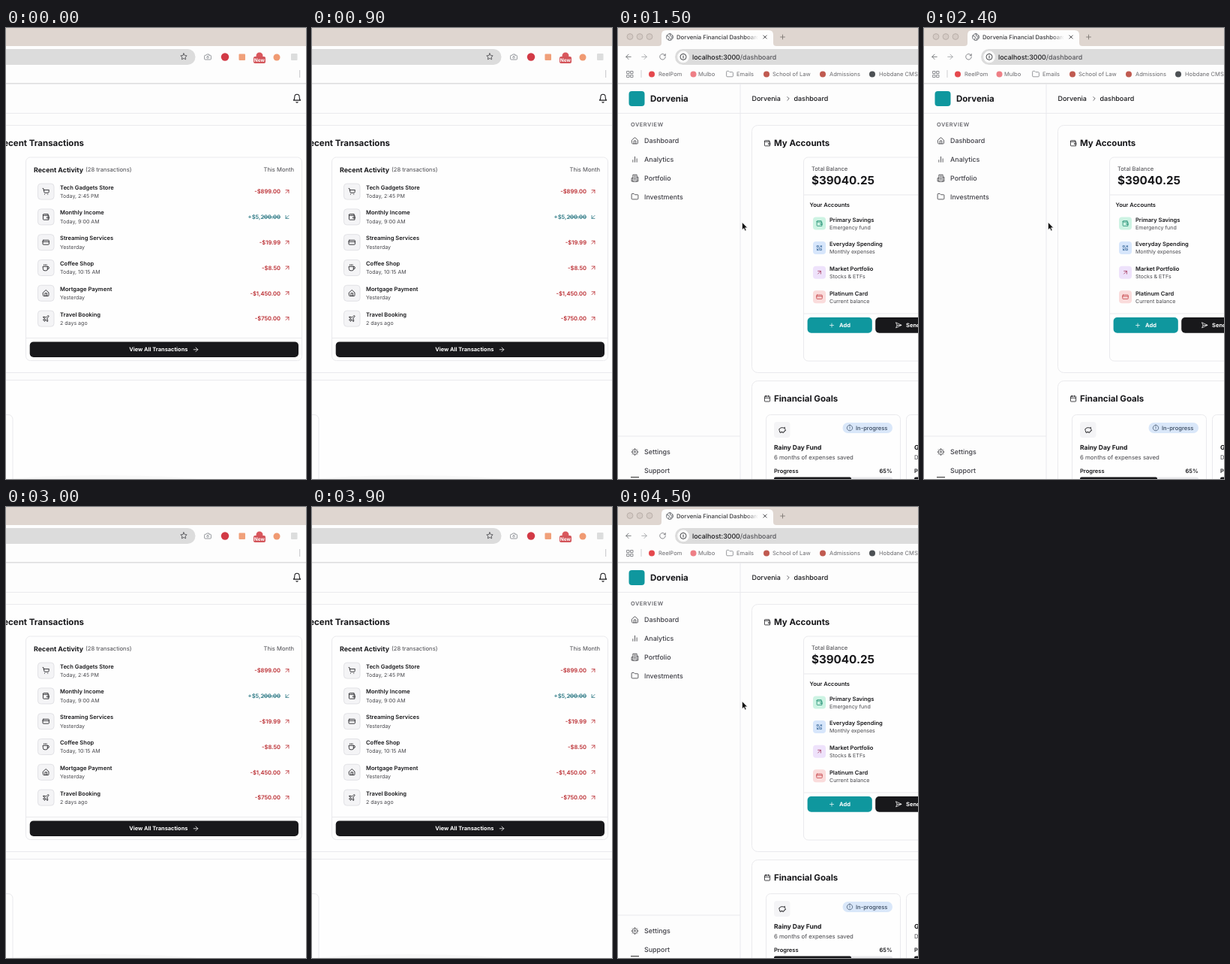
Write an HTML page that moves like this. It is 400 px wide and 600 px high and loops after 6 s.

```html
<!DOCTYPE html>
<html lang="en">
<head>
<meta charset="utf-8">
<title>Dashboard</title>
<style>
html, body { margin: 0; width: 100%; height: 100%; overflow: hidden; background: #fdfdfd; }
svg { display: block; width: 400px; height: 600px; }
text { font-family: Inter, "Open Sans", sans-serif; text-rendering: geometricPrecision; }
.icon { fill: none; stroke-width: 2; stroke-linecap: round; stroke-linejoin: round; }
</style>
</head>
<body>
<svg id="stage" viewBox="0 0 400 600"></svg>
<script>
const INK = '#18181b', GREY = '#46464b', LINE = '#eaeaed', TEAL = '#0f979e', RED = '#b9282d';
const BAR = '#dfd6d0', FIELD = '#dcdcdc';

// Icons on a 24 unit grid
const ICONS = {
  cart: 'M2 2h2l3 13a2 2 0 0 0 2 1h10a2 2 0 0 0 2-1l1-8H5M8 20.5v.5M18 20.5v.5',
  wallet: 'M19 7V3H5a2 2 0 0 0 0 4h16v5h-4a2 2 0 0 0 0 4h5v-4h-1M3 5v14a2 2 0 0 0 2 2h16v-5',
  card: 'M4 5h16a2 2 0 0 1 2 2v10a2 2 0 0 1-2 2H4a2 2 0 0 1-2-2V7a2 2 0 0 1 2-2zM2 10h20',
  cup: 'M6 2v2M10 2v2M14 2v2M3 8h14v9a4 4 0 0 1-4 4H7a4 4 0 0 1-4-4zM17 8h1a4 4 0 0 1 0 8h-1',
  home: 'M9 21v-9h6v9M3 10l9-8 9 8v9a2 2 0 0 1-2 2H5a2 2 0 0 1-2-2z',
  plane: 'M18 19l-2-8 4-4c2-2 1-4 1-4s-2-1-4 1l-4 4-9-2-1 2 6 4-2 3H4l-1 1 3 2 2 3 1-1v-3l3-2 4 6z',
  bell: 'M6 8a6 6 0 0 1 12 0c0 7 3 9 3 9H3s3-2 3-9M10 21a2 2 0 0 0 4 0',
  upRight: 'M7 7h10v10M7 17 17 7',
  downLeft: 'M17 17H7V7M17 7 7 17',
  right: 'M5 12h14m-7-7 7 7-7 7',
  left: 'M19 12H5m7 7-7-7 7-7',
  plus: 'M5 12h14M12 5v14',
  cross: 'M18 6 6 18M6 6l12 12',
  chevron: 'm9 18 6-6-6-6',
  send: 'M3 3l4 9-4 9 19-9zM7 12h15',
  calendar: 'M5 4h14a2 2 0 0 1 2 2v14a2 2 0 0 1-2 2H5a2 2 0 0 1-2-2V6a2 2 0 0 1 2-2zM3 10h18M8 2v4M16 2v4',
  bars: 'M18 20V10M12 20V4M6 20v-6',
  building: 'M6 22V2h12v20zM6 12H2v10h4M18 9h4v13h-4M10 6h4M10 10h4M10 14h4M10 18h4',
  folder: 'M20 20a2 2 0 0 0 2-2V8a2 2 0 0 0-2-2h-8l-3-3H4a2 2 0 0 0-2 2v13a2 2 0 0 0 2 2z',
  gear: 'M12 4a8 8 0 1 0 .01 0zM12 9a3 3 0 1 0 .01 0zM12 2v2M12 20v2M2 12h2M20 12h2M5 5l1 1M18 18l1 1M5 19l1-1M18 6l1-1',
  pig: 'M5 9c3-4 9-4 12-2l3-2v4l2 3v3h-3l-2 5h-4v-2h-3v2H6l-1-5c-2-2-2-4 0-6z',
  alert: 'M12 2a10 10 0 1 0 .01 0zM12 7v5M12 16v.5',
  swap: 'M4 4h5v5H4zM20 4 4 20M15 5h5v5M14 15h6v5h-6zM4 14v6h5',
  star: 'M12 2l3 6.5 7 .8-5 4.9 1.3 7L12 17.8 5.7 21.2 7 14.2 2 9.3 9 8.5z',
  camera: 'M15 4H9L7 7H4a2 2 0 0 0-2 2v9a2 2 0 0 0 2 2h16a2 2 0 0 0 2-2V9a2 2 0 0 0-2-2h-3zM12 10a3 3 0 1 0 .01 0z',
  reload: 'M21 12a9 9 0 1 1-3-6.7L21 8M21 3v5h-5',
  grid: 'M4 4h6v6H4zM14 4h6v6h-6zM4 14h6v6H4zM14 14h6v6h-6z',
  globe: 'M12 2a10 10 0 1 0 .01 0zM3 8l6 2 2 4-3 6M14 3l-1 5 4 2 4-1M15 20l1-5 5-1'
};

// Text is placed by the middle of its capitals
const text = (x, y, s, size, weight = 400, fill = INK, more = '') =>
  `<text x="${x}" y="${y + size * .363}" font-size="${size}" font-weight="${weight}" fill="${fill}" ${more}>${s}</text>`;
const END = 'text-anchor="end"';
const rect = (x, y, w, h, r = 0, fill = 'none', stroke = 'none') =>
  `<rect x="${x}" y="${y}" width="${w}" height="${h}" rx="${r}" fill="${fill}" stroke="${stroke}"/>`;
const dot = (x, y, r, fill, stroke = 'none') =>
  `<circle cx="${x}" cy="${y}" r="${r}" fill="${fill}" stroke="${stroke}"/>`;
const icon = (name, x, y, size = 10, color = INK) =>
  `<path class="icon" d="${ICONS[name]}" stroke="${color}" transform="translate(${x - size / 2} ${y - size / 2}) scale(${size / 24})"/>`;
const hline = (x, y, w, color = LINE) => rect(x, y, w, 1, 0, color);
const panel = (x, y, w, h, r) => rect(x + .5, y + .5, w, h, r, '#fefefe', LINE);
const heading = (x, y, s, more) => text(x, y, s, 11.5, 700, INK, more);
const label = (x, y, s, color = INK, more = '') => text(x, y, s, 7.55, 600, color, more);
const note = (x, y, s) => text(x, y, s, 7.05, 400, GREY);

const frame = () => rect(0, 0, 400, 600, 0, '#fdfdfd') + rect(0, 0, 400, 24, 0, BAR)
  + rect(0, 73, 400, 1.6, 0, '#dededf') + hline(0, 113, 400);

function activity() {
  const rows = [
    ['cart', 'Tech Gadgets Store', 'Today, 2:45 PM', '-$899.00'],
    ['wallet', 'Monthly Income', 'Today, 9:00 AM', '+$5,200.00'],
    ['card', 'Streaming Services', 'Yesterday', '-$19.99'],
    ['cup', 'Coffee Shop', 'Today, 10:15 AM', '-$8.50'],
    ['home', 'Mortgage Payment', 'Yesterday', '-$1,450.00'],
    ['plane', 'Travel Booking', '2 days ago', '-$750.00']
  ];
  const list = rows.map(([name, title, when, sum], i) => {
    const y = 217.6 + i * 33.8, gain = sum[0] === '+', color = gain ? '#2a7783' : RED;
    return rect(42.5, y - 10.5, 21.5, 21, 4, '#f4f4f6', '#e2e2e6') + icon(name, 53.2, y)
      + label(72, y - 5.8, title) + note(72, y + 5.8, when)
      + label(366, y, sum, color, END) + (gain ? rect(342, y - .3, 24, .8, 0, color) : '')
      + icon(gain ? 'downLeft' : 'upRight', 375, y, 9.5, color);
  }).join('');
  return frame()
    + rect(-20, 28, 272.5, 21, 10.5, FIELD) + icon('star', 237, 38, 10, GREY)
    + icon('camera', 269, 38.5, 10.5, '#85898e') + dot(292, 38.5, 5.2, '#d23a46')
    + rect(310.5, 34.5, 8.5, 8.5, 1, '#f0a07a') + dot(338, 37, 4.5, '#d9575d')
    + rect(330, 38, 16, 9, 2, '#d3545a') + text(338, 42.6, 'New', 6.5, 700, '#fff', 'text-anchor="middle"')
    + dot(361, 39, 4.5, '#f09a72') + rect(380, 34, 8.5, 9, 1, '#dcdddd')
    + rect(391, 56, 1.2, 10, 0, '#cfcfd2') + icon('bell', 388, 93.5, 12.5)
    + panel(-30, 129, 460, 329, 8) + heading(104, 153, 'Recent Transactions', END)
    + panel(26, 171.5, 368, 270.5, 6)
    + text(37, 188.3, 'Recent Activity', 8.85, 700) + text(106, 188.6, '(28 transactions)', 7.65, 400, GREY)
    + text(384, 188.3, 'This Month', 7.65, 400, GREY, END)
    + list + hline(27, 412, 367)
    + rect(31.7, 417.4, 358.3, 20.6, 5, INK) + text(164.2, 427.7, 'View All Transactions', 7.4, 700, '#fff')
    + icon('right', 253, 427.8, 9.5, '#fff')
    + panel(-30, 468, 460, 160, 8) + panel(-30, 514, 38.5, 120, 6)
    + '<ellipse cx="130" cy="604" rx="140" ry="9" opacity=".025"/>';
}

function browser() {
  const marks = [
    [54, 'ReelPom', 45, '#e5484d'], [107, 'Mulbo', 100.5, '#ee7f86'], [158, 'Emails'],
    [206, 'School of Law', 198, '#c05a50'], [282, 'Admissions', 273, '#c05a50'], [348, 'Hobdane CMS', 339, '#4c5054']
  ];
  return [16, 29, 42].map(x => dot(x, 11.5, 3.9, '#d5cbc5', '#b9afa9')).join('')
    + '<path d="M54 24q4 0 4-4V9q0-6 6-6H201q6 0 6 6v11q0 4 4 4z" fill="#fdfdfd"/>'
    + icon('globe', 69, 12, 10.5, '#55595e')
    + text(78, 12, 'Dorvenia Financial Dashboard', 7.75, 500, '#3a3a3d', 'clip-path="url(#tab)"')
    + rect(170, 5, 17, 15, 0, 'url(#fade)')
    + icon('cross', 196, 12, 8.5) + icon('plus', 219.5, 12, 10, '#77716d')
    + icon('left', 14, 38.3, 11, '#707276') + icon('right', 35, 38.3, 11, '#a3a5a8') + icon('reload', 59.5, 38.3, 10, '#707276')
    + rect(76, 28, 360, 21, 10.5, FIELD) + dot(87, 38.4, 7.8, '#fdfdfd') + dot(87, 38.4, 4, 'none', '#3f4144')
    + rect(86.5, 36.5, 1, 4, 0, '#3f4144')
    + text(99, 38.6, 'localhost:3000<tspan fill="#55555a">/dashboard</tspan>', 8.85, 500)
    + icon('grid', 16, 61.5, 12, '#8a8c90') + rect(30.5, 56, 1, 10, 0, '#cfcfd2')
    + icon('folder', 149, 61.3, 10.5, '#8a8c90')
    + marks.map(([x, s, mx, color]) => text(x, 61.5, s, 7.55, 400, '#6a6a6e')
      + (color ? dot(mx, 61.5, 4, color) : '')).join('');
}

function sidebar() {
  const items = [['home', 'Dashboard', 150], ['bars', 'Analytics', 174.8], ['building', 'Portfolio', 199.6],
    ['folder', 'Investments', 224.4], ['gear', 'Settings', 564]];
  return rect(162.5, 74, 1, 526, 0, LINE) + rect(14.5, 84, 21, 20, 4, TEAL)
    + heading(43, 94, 'Dorvenia') + text(17, 128.6, 'OVERVIEW', 7.3, 600, '#66666c', 'letter-spacing=".6"')
    + items.map(([name, s, y]) => icon(name, 22.5, y, 10.5, GREY) + text(35, y, s, 8.9, 500, '#3f3f46')).join('')
    + hline(0, 542.5, 163) + text(35, 588.8, 'Support', 8.9, 500, '#3f3f46') + rect(17, 597, 11, 1.2, 0, '#444');
}

function accounts() {
  const rows = [
    ['wallet', 'Primary Savings', 'Emergency fund', '#cdf3e3', '#12876a'],
    ['swap', 'Everyday Spending', 'Monthly expenses', '#d7e6fb', '#3a6a9c'],
    ['upRight', 'Market Portfolio', 'Stocks &amp; ETFs', '#eee2fb', '#a02c52'],
    ['card', 'Platinum Card', 'Current balance', '#fadcdc', '#c0353a']
  ];
  return text(178.5, 93.7, 'Dorvenia', 8.95, 500) + icon('chevron', 227, 94, 9.5, GREY) + text(234.5, 93.7, 'dashboard', 8.95, 500)
    + panel(178, 129, 260, 329, 8) + icon('wallet', 199, 153.3, 9.5) + heading(208, 153, 'My Accounts')
    + panel(247, 171.5, 200, 271, 6) + text(258, 187.2, 'Total Balance', 7.6, 400, GREY)
    + text(258, 202.2, '$39040.25', 15.2, 700) + hline(248, 221.5, 160)
    + label(255.5, 235.2, 'Your Accounts')
    + rows.map(([name, title, about, back, color], i) => {
      const y = 260 + i * 32.6;
      return rect(260, y - 8.5, 17, 17, 4, back) + icon(name, 268.5, y, 9, color)
        + label(282, y - 5, title) + note(282, y + 5.3, about);
    }).join('')
    + hline(248, 379.5, 160)
    + rect(252.6, 385, 86.2, 20.8, 5, TEAL) + icon('plus', 285, 395.5, 8.5, '#fff') + text(295, 395.5, 'Add', 7.5, 700, '#fff')
    + rect(343.2, 385, 86.2, 20.8, 5, INK) + icon('send', 374, 395.5, 9, '#fff') + text(384, 395.5, 'Send', 7.5, 700, '#fff');
}

function goals() {
  return panel(178, 469, 260, 160, 8) + icon('calendar', 199, 493, 9.5) + heading(208, 492.7, 'Financial Goals')
    + panel(197, 514, 179, 110, 6) + panel(384, 514, 179, 110, 6)
    + rect(208, 524, 21.5, 21, 4, '#f4f4f6') + icon('pig', 218.7, 534.5, 11)
    + rect(299.5, 525, 66.5, 14, 7, '#d9e7f9') + icon('alert', 309, 532, 9, '#42566f')
    + text(317, 532, 'In-progress', 7.6, 500, '#38495f')
    + text(208, 558, 'Rainy Day Fund', 8.45, 700) + text(208, 571.3, '6 months of expenses saved', 7.8, 400, GREY)
    + label(208, 588.8, 'Progress') + label(365.5, 588.8, '65%', INK, END)
    + rect(208, 597.5, 158, 5, 2.5, '#e9e9ec') + rect(208, 597.5, 103, 5, 2, INK)
    + text(395, 558, 'Goal', 8.45, 700) + text(395, 571.3, 'Dream', 7.8, 400, GREY)
    + label(395, 588.8, 'Progress') + rect(395, 597.5, 30, 5, 2, INK);
}

const pointer = '<path d="M165.5 258.5v10l2.3-2 1.7 3.5 1.6-.8-1.6-3.4h3z" fill="#111" stroke="#fff" stroke-width=".6"/>';

stage.innerHTML = `<defs><clipPath id="tab"><path d="M78 4h108v16H78z"/></clipPath>
<linearGradient id="fade"><stop stop-color="#fdfdfd" stop-opacity="0"/><stop offset="1" stop-color="#fdfdfd"/></linearGradient></defs>
<g>${activity()}</g><g>${frame()}${browser()}${sidebar()}${accounts()}${goals()}${pointer}</g>`;

const views = stage.querySelectorAll('g');
const start = performance.now();
function draw() {
  const shown = Math.floor((performance.now() - start) / 1500) % 2;
  views.forEach((view, i) => view.style.display = i === shown ? '' : 'none');
  requestAnimationFrame(draw);
}
draw();
</script>
</body>
</html>
```
